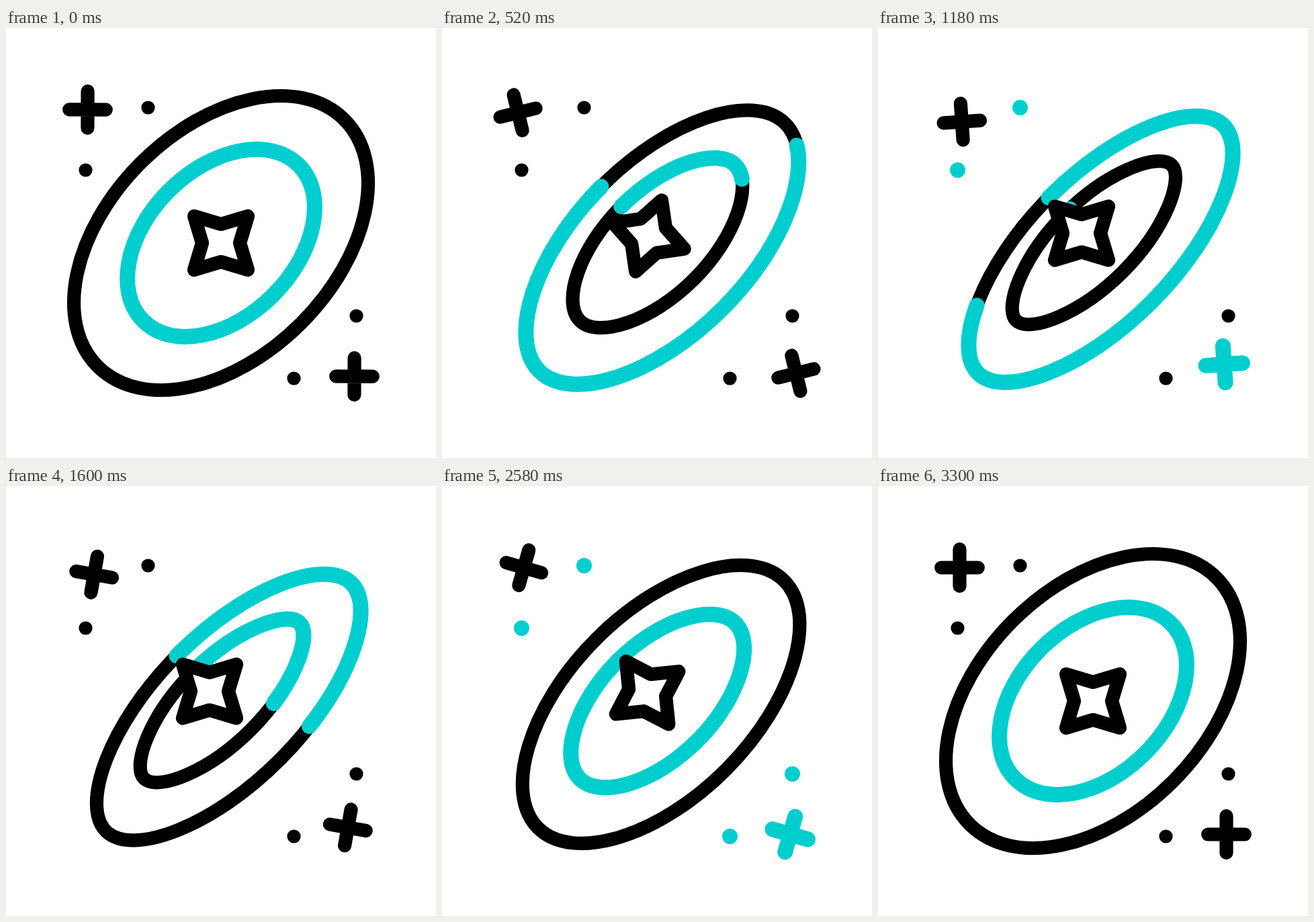
Write an HTML page that moves like this. It is 640x640 px and loops after 3.6 s.

```html
<!DOCTYPE html>
<html lang="en">
<head>
<meta charset="utf-8">
<title>Spinning galaxy</title>
<style>
  html, body { margin: 0; height: 100%; overflow: hidden; background: #fff; }
  svg { display: block; width: 100vw; height: 100vh; }
  path { fill: none; stroke: #000; stroke-width: 20.2; stroke-linecap: round; stroke-linejoin: round; }
  .teal { stroke: #00cece; stroke-width: 23; }
  #star { fill: #fff; }
</style>
</head>
<body>
<svg viewBox="0 0 640 640">
  <path id="outer"/>
  <path id="outerTeal" class="teal" pathLength="1"/>
  <path id="inner"/>
  <path id="innerTeal" class="teal" pathLength="1"/>
  <path id="star" d="M-40-40 0-28 40-40 28 0 40 40 0 28-40 40-28 0Z"/>
  <path id="plusA" d="M0-27.3V27.3M-27.3 0H27.3"/>
  <path id="plusB" d="M0-27.3V27.3M-27.3 0H27.3"/>
  <path id="dotsA" d="M211.5 118.5h0M118.5 211.5h0"/>
  <path id="dotsB" d="M521.5 428.5h0M428.5 521.5h0"/>
</svg>
<script>
const LOOP = 3600;
const ROUND = 0.5523; // Bezier handle length of a quarter circle
const el = id => document.getElementById(id);

const progress = (t, from, to) => Math.min(1, Math.max(0, (t - from) / (to - from)));
const smooth = x => x * x * (3 - 2 * x);
const ease = (t, from, to, skew = 1) => smooth(progress(t, from, to) ** skew);
const between = (t, from, to) => t >= from && t < to;

// time, x and y of the plus sign's drift from its resting place
const DRIFT = [
  [0, 0, 0], [320, -3, 1.5], [540, -9, 5], [740, -16, 13], [820, -17, 16],
  [1100, -2.5, 19], [1250, 7, 16.5], [1600, 9.7, 10.2], [2180, 2.5, 2], [2800, 0, 0]
];

function slope(i, axis) {
  if (i === 0 || i === DRIFT.length - 1) return 0;
  const before = DRIFT[i - 1], after = DRIFT[i + 1];
  return (after[axis] - before[axis]) / (after[0] - before[0]);
}

// Cubic Hermite curve through the drift points
function drift(t, axis) {
  const i = DRIFT.findIndex(p => p[0] > t) - 1;
  if (i < 0) return 0;
  const a = DRIFT[i], b = DRIFT[i + 1], span = b[0] - a[0];
  const u = (t - a[0]) / span, v = 1 - u;
  return a[axis] * (1 - smooth(u)) + b[axis] * smooth(u)
    + span * u * v * (v * slope(i, axis) - u * slope(i + 1, axis));
}

const place = (id, x, y, angle) =>
  el(id).setAttribute("transform", `translate(${x} ${y}) rotate(${angle})`);
const paint = (id, teal) => el(id).classList.toggle("teal", teal);

// Oval from its upper left side, counterclockwise; a smaller tip gives sharper ends
function ring(id, x, y, angle, a, b, tip) {
  const h = a * ROUND, k = tip * ROUND;
  const d = `M0 ${-b}C${-h} ${-b} ${-a} ${-k} ${-a} 0S${-h} ${b} 0 ${b}`
    + `S${a} ${k} ${a} 0S${h} ${-b} 0 ${-b}Z`;
  for (const part of [id, id + "Teal"]) {
    el(part).setAttribute("d", d);
    place(part, x, y, angle);
  }
}

function trim(id, start, end) {
  const style = el(id).style, length = end - start;
  style.display = length > 0.0005 ? "" : "none";
  style.strokeDasharray = length > 0.9995 ? "none" : `${length} 2`;
  style.strokeDashoffset = -start;
}

function draw(t) {
  const tilt = ease(t, 85, 785) - ease(t, 2220, 3300, 0.67);
  ring("outer", 320 + 11.5 * tilt, 320 + 9.3 * tilt, -45 - 0.3 * tilt,
    259.6, 168.7 - 59.7 * tilt, 168.7 - 70.7 * tilt);
  ring("inner", 320 + 1.3 * tilt, 320 - 0.3 * tilt, -45,
    163.7, 109.8 - 48.8 * tilt, 109.8 - 61.5 * tilt);

  const sweep = ease(t, 0, 800);
  if (t < 800) {
    trim("outerTeal", 0, sweep);
    trim("innerTeal", sweep, 1);
  } else {
    trim("outerTeal", ease(t, 800, 2295), 1);
    trim("innerTeal", 1 - ease(t, 1105, 2200), 1);
  }

  const shift = ease(t, 0, 790) - ease(t, 2345, 3300);
  place("star", 320 - 17 * shift, 320 - 14.5 * shift, 360 * tilt);

  const turn = progress(t, 0, 1110);
  const spin = 360 * ((turn + smooth(turn)) / 2 - ease(t, 1075, 2800));
  const x = 121.5 + drift(t, 1), y = 121.5 + drift(t, 2);
  place("plusA", x, y, spin);
  place("plusB", 640 - x, 640 - y, spin);

  const late = between(t, 2000, 2760);
  paint("plusB", between(t, 600, 1300) || late);
  paint("dotsA", between(t, 600, 1300) || late);
  paint("dotsB", late);
}

function tick() {
  draw(performance.now() % LOOP);
  requestAnimationFrame(tick);
}
tick();
</script>
</body>
</html>
```
